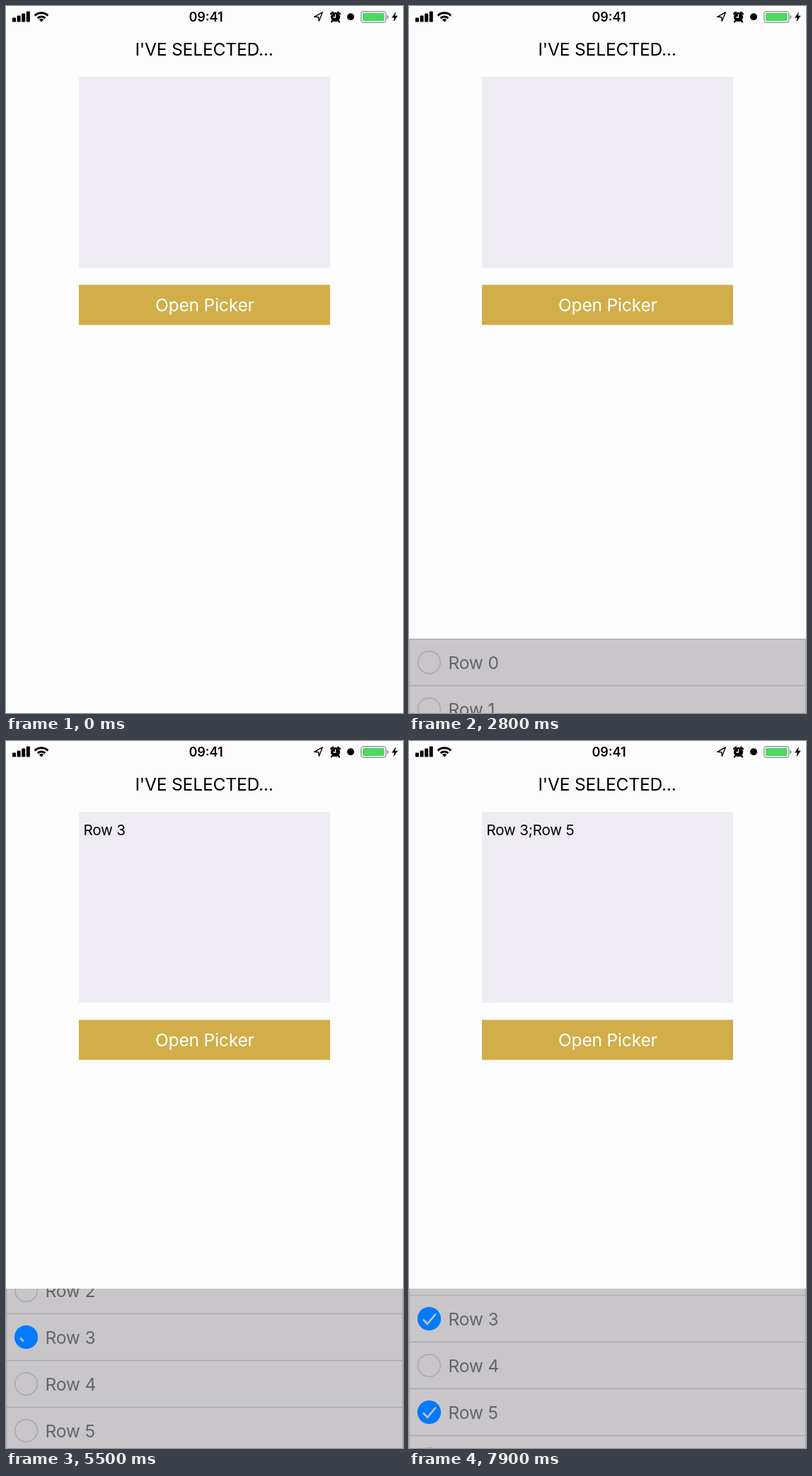
An HTML page for the animation above (8 s loop, 561 by 998 pixels).

```html
<!DOCTYPE html>
<html lang="en">
<head>
<meta charset="utf-8">
<title>Row picker</title>
<style>
  html, body { margin: 0; width: 100%; height: 100%; overflow: hidden; background: #fefdfe; }
  svg { display: block; }
  text { font: 24.6px Inter, Roboto, sans-serif; letter-spacing: -0.2px; white-space: pre; }
  .middle { text-anchor: middle; }
  #clock { font-size: 18px; font-weight: 600; letter-spacing: 0; }
  #chosen { font-size: 20.6px; }
  #rows text { fill: #666567; }
  #rows .cell { fill: #c8c6c9; stroke: #a8a7a9; stroke-width: 1.2; }
  #rows .ring { fill: none; stroke: #a8a7a9; stroke-width: 1.4; }
  #rows .disc { fill: #007aff; }
  #rows .tick { fill: none; stroke: #c3c1c4; stroke-width: 2.6; stroke-dasharray: 1 2; }
</style>
</head>
<body>
<svg width="100%" height="100%" viewBox="0 0 561 998">
  <rect width="561" height="998" fill="#fefdfe"/>

  <!-- status bar -->
  <g id="bars"></g>
  <g fill="none" stroke="#000" stroke-width="3">
    <path d="M40.8 13.6a13.2 13.2 0 0 1 18.4 0M44.6 17.2a7.8 7.8 0 0 1 10.8 0"/>
  </g>
  <path d="M50 22.6l-3.2-3.3a4.6 4.6 0 0 1 6.4 0z"/>
  <text id="clock" class="middle" x="282.5" y="22">09:41</text>
  <path d="M447.3 8.8l-11.6 6.5 6 .5 .7 5.4z" fill="none" stroke="#000" stroke-width="1.4" stroke-linejoin="round"/>
  <circle cx="465.5" cy="15.6" r="6.6"/>
  <path d="M459 11.2l3-2.6M472 11.2l-3-2.6M461.5 20.5l-1.6 2M469.5 20.5l1.6 2" stroke="#000" stroke-width="2.2" stroke-linecap="round"/>
  <path d="M465.5 11.6v4.4h-3.2" fill="none" stroke="#fefdfe" stroke-width="1.3"/>
  <circle cx="487" cy="15.3" r="5"/>
  <rect x="501.8" y="7.6" width="35" height="15.8" rx="3.6" fill="none" stroke="#8d8d8f" stroke-width="1.3"/>
  <rect x="504" y="9.8" width="30.6" height="11.4" rx="1.6" fill="#4cd964"/>
  <path d="M538.4 12.8q2.2 .6 2.2 2.7t-2.2 2.7z" fill="#8d8d8f"/>
  <path d="M551 8l-6 8.6h3.7l-1.3 6 6.3-8.8h-3.8z"/>

  <text class="middle" x="280" y="70">I'VE SELECTED...</text>
  <rect x="103" y="100" width="355" height="269.6" fill="#efedf3"/>
  <text id="chosen" x="109.5" y="132.5"></text>
  <rect x="103" y="393.6" width="355" height="56.6" fill="#d1ae4a"/>
  <text class="middle" x="280.8" y="431" fill="#fff">Open Picker</text>

  <svg id="sheet" y="998" width="561" height="225"><g id="rows"></g></svg>
</svg>
<script>
const LOOP = 8000, STEP = 100, ROW_HEIGHT = 66, ROW_COUNT = 10;
const find = id => document.getElementById(id);

// Keyframes are [time, value] pairs.
const sheetKeys = [[2600, 998], [2700, 984], [2800, 893], [2900, 773]];
const scrollKeys = [
  [4200, 0], [4300, 25], [4400, 70], [4500, 113], [4600, 145], [4700, 160], [4900, 163],
  [6200, 163], [6300, 207], [6400, 228], [6500, 238], [6600, 243], [6700, 244],
  [7700, 244], [7800, 229], [7900, 189]
];
const selections = [{ row: 3, start: 5400 }, { row: 5, start: 6900 }];

function valueAt(keys, t) {
  const next = keys.findIndex(([time]) => time > t);
  if (next === 0) return keys[0][1];
  if (next < 0) return keys[keys.length - 1][1];
  const [t0, v0] = keys[next - 1], [t1, v1] = keys[next];
  return v0 + (v1 - v0) * (t - t0) / (t1 - t0);
}

const smooth = p => {
  p = Math.max(0, Math.min(1, p));
  return p * p * (3 - 2 * p);
};

find('bars').innerHTML = [6, 8.8, 11.8, 15].map((h, i) =>
  `<rect x="${9 + i * 6.6}" y="${22.4 - h}" width="5" height="${h}" rx="1.2"/>`).join('');

find('rows').innerHTML = Array.from({ length: ROW_COUNT }, (_, i) => `
  <g transform="translate(0 ${i * ROW_HEIGHT})">
    <rect class="cell" x=".5" y=".5" width="560" height="${ROW_HEIGHT}"/>
    <circle class="ring" cx="28.5" cy="33.5" r="15.8"/>
    <g id="mark${i}" visibility="hidden">
      <circle class="disc" cx="28.5" cy="33.5" r="16.6"/>
      <path class="tick" pathLength="1" d="M20 34.5l6 6.2 12-14.2"/>
    </g>
    <text x="55.5" y="42.7">Row ${i}</text>
  </g>`).join('');

function render(t) {
  find('sheet').setAttribute('y', valueAt(sheetKeys, t));
  find('rows').setAttribute('transform', `translate(0 ${-valueAt(scrollKeys, t)})`);
  for (const { row, start } of selections) {
    const mark = find('mark' + row);
    mark.setAttribute('visibility', t >= start ? 'visible' : 'hidden');
    mark.lastElementChild.style.strokeDashoffset = 1 - smooth((t - start + STEP) / 600);
  }
  find('chosen').textContent = selections
    .filter(({ start }) => t >= start).map(({ row }) => 'Row ' + row).join(';');
}

const origin = performance.now();
function tick() {
  const elapsed = (performance.now() - origin) % LOOP;
  render(Math.floor(elapsed / STEP) * STEP);
  requestAnimationFrame(tick);
}
tick();
</script>
</body>
</html>
```
